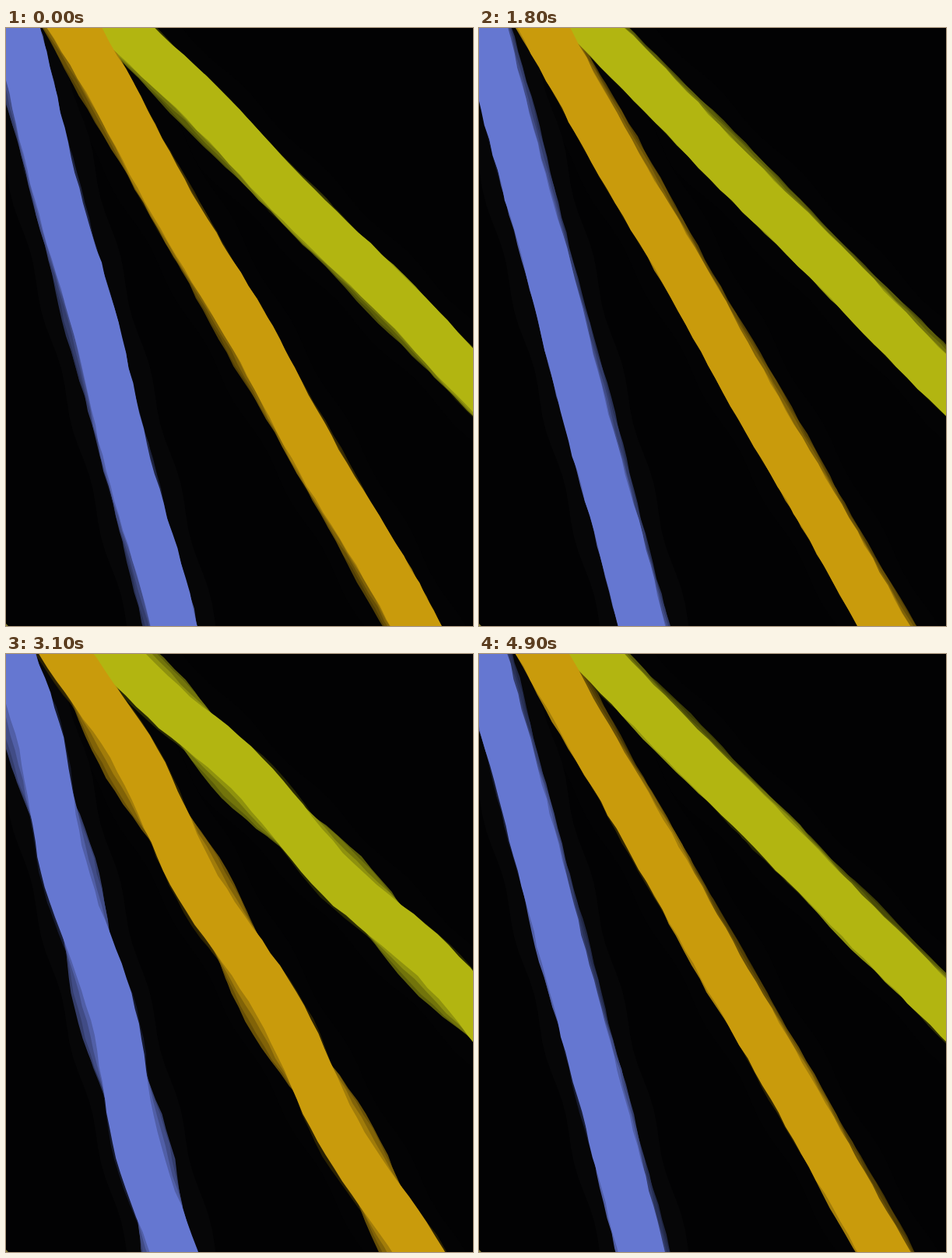
An HTML page for the animation above (5 s loop, 600 px wide and 768 px high).

```html
<!DOCTYPE html>
<html lang="en">
<head>
<meta charset="utf-8">
<title>Vibrating strings</title>
<style>
html, body { margin: 0; width: 100%; height: 100%; overflow: hidden; background: #020203; }
svg { display: block; width: 600px; height: 768px; }
</style>
</head>
<body>
<svg id="stage" viewBox="0 0 600 768"></svg>
<script>
// The picture steps every 100 ms; each step leaves several fading echoes
const STEP = 100, COUNT = 50, PLUCK = 25;
const ECHOES = 10, PER_STEP = 3, FADE = 0.8;
const TAU = 2 * Math.PI;

// Each string: rest line, width, colour, wavelength and position of a trough
const strings = [
  { from: [150.5, 0], to: [600, 453], width: 57, rgb: [178, 181, 17], wave: 342, trough: 75, glow: '#030304' },
  { from: [85, 0], to: [524, 768], width: 59, rgb: [201, 155, 12], wave: 372, trough: 362, glow: '#030304' },
  { from: [9.5, 0], to: [212.5, 768], width: 59, rgb: [101, 119, 209], wave: 368, trough: 312, glow: '#060607' }
];

for (const s of strings) {
  const dx = s.to[0] - s.from[0], dy = s.to[1] - s.from[1], len = Math.hypot(dx, dy);
  s.dir = [dx / len, dy / len];
}

const stage = document.getElementById('stage');

function addPath(fill) {
  const path = document.createElementNS('http://www.w3.org/2000/svg', 'path');
  path.setAttribute('fill', fill);
  stage.appendChild(path);
  return path;
}

function noise(seed) {
  const v = Math.sin(seed * 12.9898) * 43758.5453;
  return 2 * (v - Math.floor(v)) - 1;
}

const mod = (a, b) => ((a % b) + b) % b;

// Sideways shift of a string at distance d along it
function shift(s, d, frame) {
  const age = mod(frame - PLUCK, COUNT);
  const energy = Math.exp(-age / 19);
  const swing = Math.cos(TAU * 0.38 * (age - 1));
  const ripple = Math.cos(TAU * (d - s.trough + 4 * age) / s.wave);
  const sway = 3.5 * Math.cos(TAU * 0.42 * frame) * (1 - energy) - 3 * energy;
  return sway - 11 * energy * swing * ripple;
}

// Closed outline of a band, given the offset of each side
function band(s, offset) {
  const [ux, uy] = s.dir;
  const right = [], left = [];
  for (let d = -80, i = 0; d <= 960; d += 20, i++) {
    for (const side of [1, -1]) {
      const o = offset(d, side, i);
      const point = (s.from[0] + ux * d + uy * o).toFixed(1) + ' ' +
                    (s.from[1] + uy * d - ux * o).toFixed(1);
      if (side > 0) right.push(point); else left.unshift(point);
    }
  }
  return 'M' + right.concat(left).join('L') + 'Z';
}

function outline(s, index, tick) {
  const frame = tick / PER_STEP;
  return band(s, (d, side, i) =>
    shift(s, d, frame) + side * s.width / 2 +
    noise(i + 61 * tick + 9500 * index + 30000 * (side + 1)));
}

for (const s of strings) {
  addPath(s.glow).setAttribute('d', band(s, (d, side) =>
    side * (s.width / 2 + 26 + 3 * Math.sin(d / 24 + side))));
}

const layers = [];
for (let age = ECHOES - 1; age >= 0; age--) {
  strings.forEach((s, index) => {
    const fill = 'rgb(' + s.rgb.map(c => Math.round(c * FADE ** age)) + ')';
    layers.push({ s, index, age, path: addPath(fill) });
  });
}
addPath('#8a8432').setAttribute('d', 'M0 765L3 768H0Z');

let shown = -1;
function draw(now) {
  const frame = Math.floor(now / STEP) % COUNT;
  if (frame !== shown) {
    shown = frame;
    for (const { s, index, age, path } of layers) {
      const tick = mod(frame * PER_STEP - age, COUNT * PER_STEP);
      path.setAttribute('d', outline(s, index, tick));
    }
  }
}

const start = performance.now();
function loop() {
  draw(performance.now() - start);
  requestAnimationFrame(loop);
}
loop();
</script>
</body>
</html>
```
